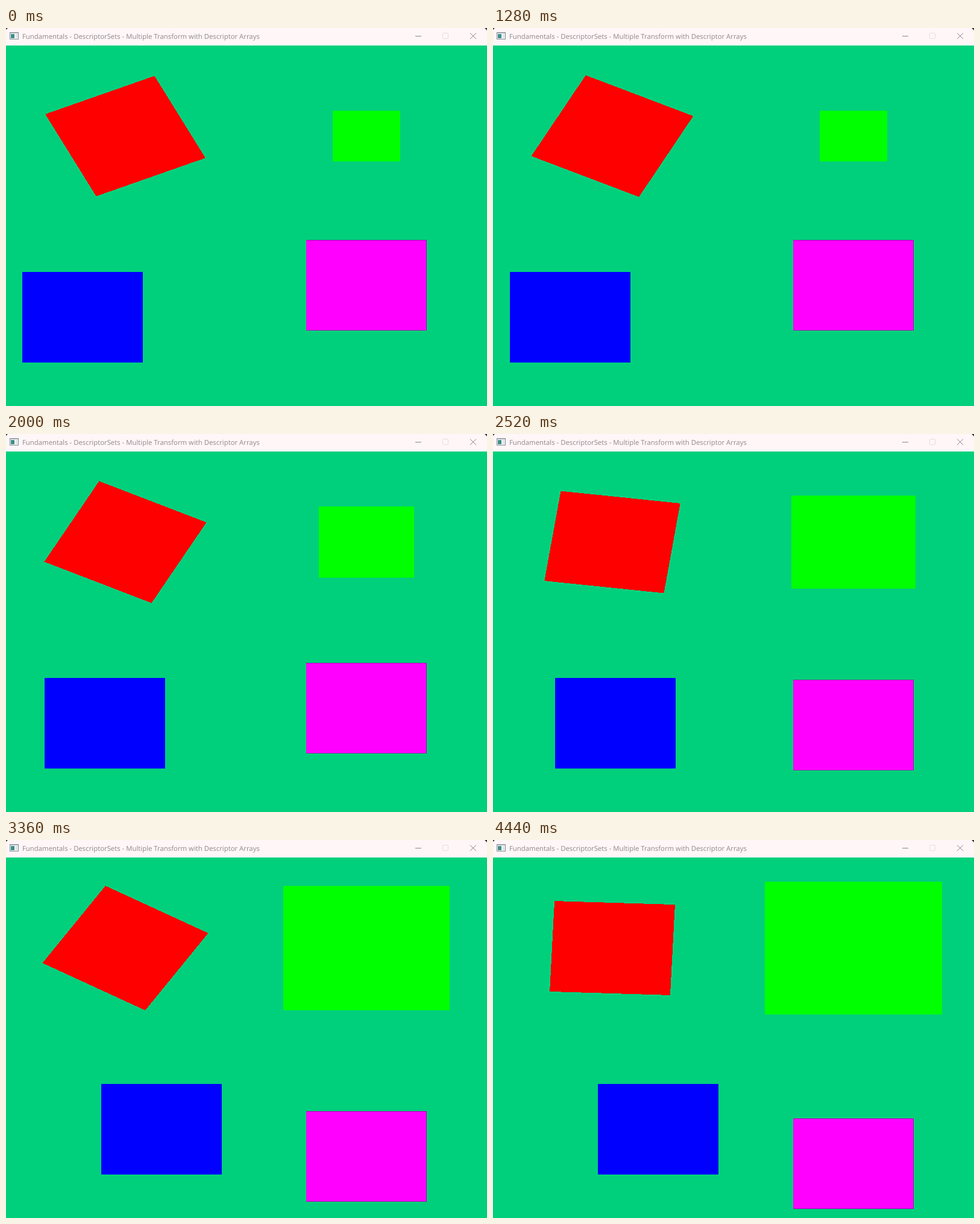
An HTML page that plays this animation: 798 by 626 pixels, repeating every 4480 ms.

```html
<!DOCTYPE html>
<html lang="en">
<head>
<meta charset="utf-8">
<title>Descriptor Arrays</title>
<style>
  html, body { margin: 0; width: 100%; height: 100%; overflow: hidden; background: #00d07c; }
  svg { display: block; }
  text { font: 11.36px "Open Sans", "Noto Sans", sans-serif; fill: #8e898b; text-rendering: geometricPrecision; }
</style>
</head>
<body>
<svg width="798" height="626" viewBox="0 0 798 626">
  <rect width="798" height="626" fill="#00d07c"/>
  <rect width="798" height="29" fill="#fff6f8"/>
  <path d="M0 0h3L0 3zM798 0h-4l4 4z" fill="#3a3637"/>

  <!-- Window icon -->
  <rect x="6.5" y="7.5" width="14" height="11" fill="#f7f9fa" stroke="#858b92"/>
  <path d="M7 8.5h13" stroke="#b5bfcb"/>
  <rect x="8" y="10" width="6" height="7" fill="#3f8c88"/>
  <path d="M15.500 11h4M15.500 13.500h4M15.500 16h4" stroke="#c4cad0"/>

  <text x="27" y="18">Fundamentals - DescriptorSets - Multiple Transform with Descriptor Arrays</text>

  <g fill="none" stroke="#8b8587">
    <path d="M679 13.500h10"/>
    <rect x="724.500" y="8.500" width="9" height="9" rx="1" stroke="#e5dddf"/>
    <path d="M770 8.500l10 9.500M780 8.500l-10 9.500"/>
  </g>

  <g shape-rendering="crispEdges">
    <polygon id="red" fill="#f00"/>
    <rect id="green" fill="#0f0"/>
    <rect id="blue" fill="#00f"/>
    <rect id="pink" fill="#f0f"/>
    <path id="edge" fill="none" stroke="#b000b8"/>
  </g>
</svg>
<script>
  const LOOP = 4480, STEP = 40, RAD = Math.PI / 180;
  // Time in ms and degrees turned; the speed rises slightly through the loop.
  const turns = [[0, 0], [560, 52.7], [1280, 141.8], [2000, 232.1], [2520, 302.8], [3360, 416.5], [4440, 567.3]];
  const [red, green, blue, pink, edge] =
    ["red", "green", "blue", "pink", "edge"].map(id => document.getElementById(id));

  function turnAt(t) {
    const i = Math.max(1, turns.findIndex(k => k[0] >= t));
    const [t0, a0] = turns[i - 1], [t1, a1] = turns[i];
    return a0 + (a1 - a0) * (t - t0) / (t1 - t0);
  }

  // Places a scaled 200 x 150 box by its centre, on whole pixels.
  function place(box, cx, cy, scale = 1) {
    const x = Math.round(cx - 100 * scale), y = Math.round(cy - 75 * scale);
    const width = Math.round(cx + 100 * scale) - x, height = Math.round(cy + 75 * scale) - y;
    Object.entries({ x, y, width, height }).forEach(([k, v]) => box.setAttribute(k, v));
    return y;
  }

  function draw(t) {
    const turn = turnAt(t);
    const wave = Math.sin((turn / 2.5 - 117.8) * RAD);

    // The turn happens in a square space that is then shown 4:3.
    const corners = [0, 1, 2, 3].map(i => {
      const a = (65 + turn + 45 + 90 * i) * RAD, r = Math.SQRT1_2 / 2;
      return [198 + 400 * r * Math.cos(a), 179 + 300 * r * Math.sin(a)];
    });
    red.setAttribute("points", corners.join(" "));

    place(green, 598, 179, 1 + wave / 2);
    place(blue, 198 + 80 * wave, 479);
    const top = place(pink, 598, 479 + 60 * wave);
    edge.setAttribute("d", `M498 ${top + .5}h199.500v149h-199.500`);
  }

  function tick() {
    draw(Math.floor(performance.now() % LOOP / STEP) * STEP);
    requestAnimationFrame(tick);
  }
  tick();
</script>
</body>
</html>
```
